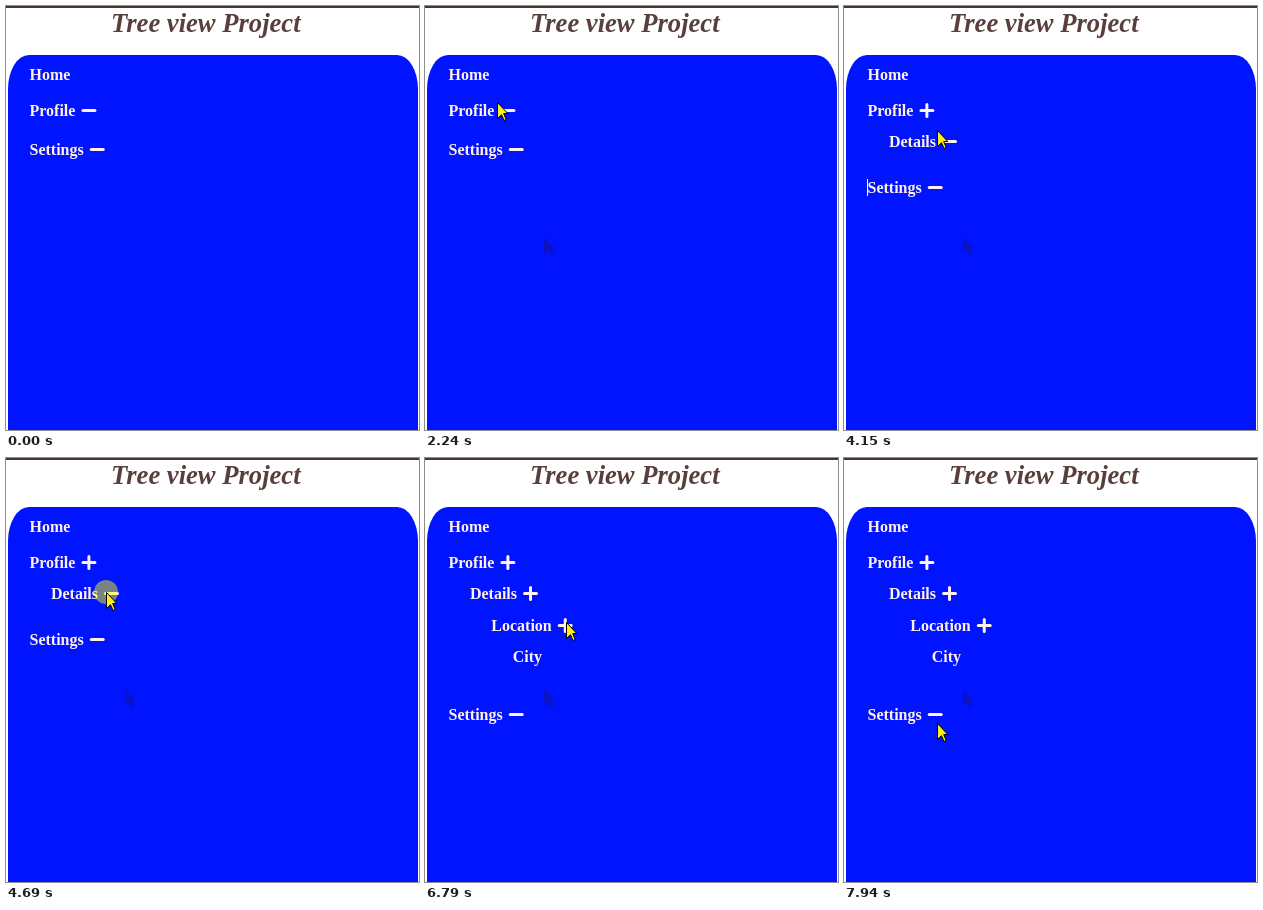
Write an HTML page that moves like this. It is 413x424 px and loops after 8000 ms.

```html
<!DOCTYPE html>
<html lang="en">
<head>
<meta charset="utf-8">
<title>Tree view</title>
<style>
  html, body { margin: 0; width: 100%; height: 100%; overflow: hidden; background: #fff; }
  svg { display: block; }
  text { font: bold 16px "Liberation Serif", "Times New Roman", Times, serif; fill: #fff1ea; }
  .title { font-size: 26.6px; font-style: italic; fill: #593f3b; }
  .icon { fill: none; stroke: #fff1ea; stroke-width: 3; stroke-linecap: round; }
</style>
</head>
<body>
<svg width="413" height="424" viewBox="0 0 413 424">
  <rect width="413" height="2" fill="#463634"/>
  <text class="title" x="105" y="26">Tree view Project</text>
  <path d="M2 424V83A21 34 0 0 1 23 49H391A21 34 0 0 1 412 83V424Z" fill="#0014ff"/>
  <g id="tree"></g>
  <path id="shadow" transform="translate(119 231)" d="M0 0V17L4 13 7 19.5 9.5 18.5 7.5 12.5H11.5Z" fill="#0a14c4"/>
  <rect id="caret" x="23" width="1" height="17" fill="#fff"/>
  <g id="cursor">
    <circle id="press" r="12" fill="#ff0" fill-opacity=".47"/>
    <path d="M.5 .5V16.5L4.5 12.7 7 18.5 9.2 17.5 6.7 11.5H10.8Z" fill="#ffee1c" stroke="#000"/>
  </g>
</svg>
<script>
const LOOP = 8000;
const STEP = 70;
const BLINK = 530;
const APPEAR = 940;
const PRESS = 140;
const opened = [3210, 4820, 6260];
const settingsY = [149, 187, 226, 262];

const $ = id => document.getElementById(id);
const show = (el, on) => el.setAttribute("visibility", on ? "visible" : "hidden");
const smooth = p => p * p * (3 - 2 * p);
const linear = p => p;

// each move runs from the previous place to x, y
const home = [295, 412];
const moves = [
  { start: 940, end: 1220, x: 130, y: 255 },
  { start: 1220, end: 1700, x: 69, y: 100, ease: linear },
  { start: 1700, end: 1770, x: 64, y: 87 },
  { start: 2030, end: 2240, x: 72, y: 96 },
  { start: 2370, end: 2650, x: 80, y: 103 },
  { start: 3810, end: 4360, x: 100, y: 134 },
  { start: 5260, end: 5710, x: 141, y: 164 },
  { start: 6980, end: 7670, x: 92, y: 250 },
  { start: 7800, end: 7940, x: 93, y: 265 }
];

function cursorAt(t) {
  let [x, y] = home;
  for (const move of moves) {
    if (t < move.start) break;
    // the pointer is sampled in whole steps counted back from the end
    const left = Math.max(0, Math.ceil((move.end - t) / STEP)) * STEP;
    const part = Math.max(0, 1 - left / (move.end - move.start));
    const p = (move.ease || smooth)(part);
    x += (move.x - x) * p;
    y += (move.y - y) * p;
  }
  return [Math.round(x), Math.round(y)];
}

function add(parent, tag, attrs) {
  const el = document.createElementNS("http://www.w3.org/2000/svg", tag);
  for (const key in attrs) el.setAttribute(key, attrs[key]);
  return parent.appendChild(el);
}

function addRow(label, depth, y, hasIcon = true) {
  const group = add($("tree"), "g", {});
  const x = 23.5 + 21.4 * depth;
  const text = add(group, "text", { x, y });
  text.textContent = label;
  const iconX = x + text.getComputedTextLength() + 13.5;
  const icon = hasIcon && add(group, "path", { class: "icon" });
  return {
    show: on => show(group, on),
    lower: dy => group.setAttribute("transform", `translate(0 ${dy})`),
    setIcon(open) {
      if (!icon) return;
      const stem = open ? `M${iconX} ${y - 11.5}v12` : "";
      icon.setAttribute("d", `M${iconX - 6} ${y - 5.5}h12${stem}`);
    }
  };
}

addRow("Home", 0, 74, false);
const branch = ["Profile", "Details", "Location", "City"].map((label, depth) =>
  addRow(label, depth, Math.round(110 + 31.3 * depth), label !== "City"));
const settings = addRow("Settings", 0, settingsY[0]);
settings.setIcon(false);

function draw(t) {
  const level = opened.filter(at => t >= at).length;
  branch.forEach((row, depth) => {
    row.show(depth <= level);
    row.setIcon(depth < level);
  });

  const base = settingsY[level];
  settings.lower(base - settingsY[0]);
  $("caret").setAttribute("y", base - 14);
  const beat = Math.floor((t - opened[0] + PRESS) / BLINK);
  show($("caret"), beat >= 0 && beat % 2 === 0);

  const visible = t >= APPEAR;
  show($("cursor"), visible);
  show($("press"), opened.some(at => t >= at - PRESS && t < at));
  show($("shadow"), t >= 1360);
  $("cursor").setAttribute("transform", `translate(${cursorAt(t)})`);
}

const begin = performance.now();
function tick() {
  draw((performance.now() - begin) % LOOP);
  requestAnimationFrame(tick);
}
tick();
</script>
</body>
</html>
```
